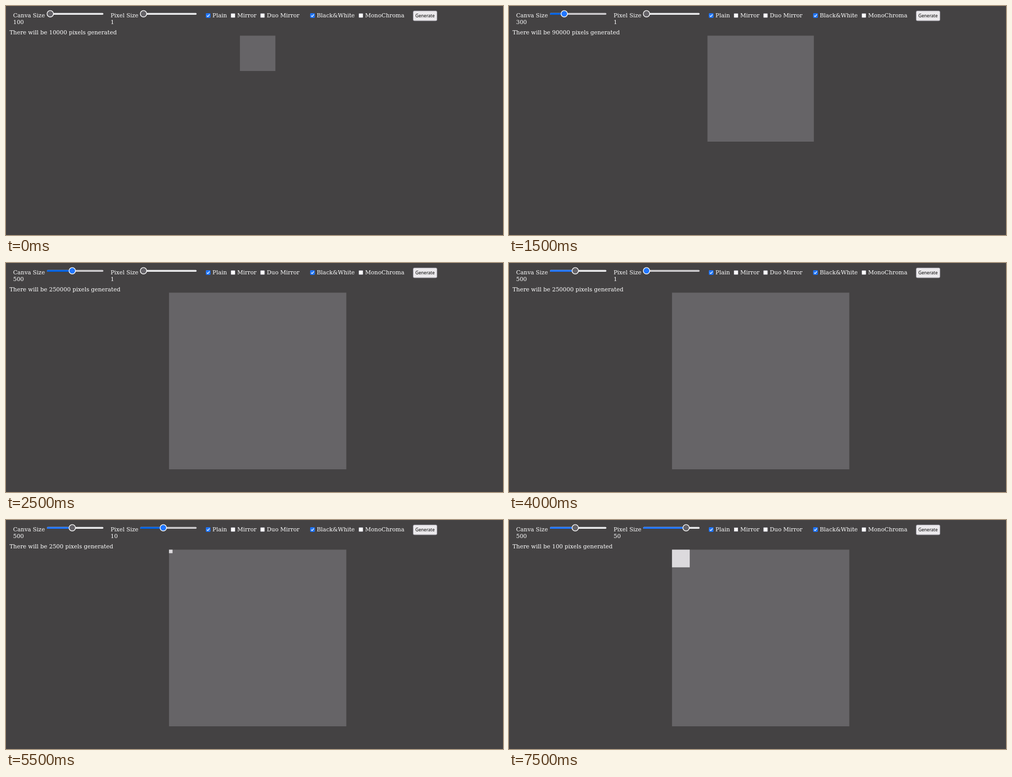
These frames come from a looping animation (960 px wide and 444 px high, 8000 ms). An HTML page:

```html
<!DOCTYPE html>
<html lang="en">
<head>
<meta charset="utf-8">
<title>Pixel generator</title>
<style>
html, body { margin: 0; width: 100%; height: 100%; overflow: hidden; background: #444243; }
svg { display: block; width: 960px; height: 444px; }
text { font: 10.96px "DejaVu Serif", "Noto Serif", serif; fill: #fff; white-space: pre; }
.button { font: 8.55px "Noto Sans", "Open Sans", sans-serif; fill: #000; }
</style>
</head>
<body>
<svg id="stage" viewBox="0 0 960 444"></svg>
<script>
const SCALE = 0.685;
const PIXELS = [1, 5, 10, 25, 50, 100];
const stage = document.getElementById("stage");

// Each step overrides the values of the one before it.
const steps = [
  { at: 0, canvas: 100, pixel: 0, track: 0, grab: 0, box: "" },
  { at: 1000, track: 1, grab: 1 },
  { at: 1500, canvas: 300 },
  { at: 2000, canvas: 400 },
  { at: 2500, canvas: 500 },
  { at: 3000, track: 0, grab: 0 },
  { at: 3500, track: 2 },
  { at: 4000, grab: 2 },
  { at: 4500, pixel: 1 },
  { at: 5000, pixel: 2 },
  { at: 6000, pixel: 4 },
  { at: 6500, grab: 0 },
  { at: 7000, track: 0, box: "Plain" },
  { at: 7500, box: "Mirror" }
];

const rect = (x, y, w, h, fill, extra = "") =>
  `<rect x="${x}" y="${y}" width="${w}" height="${h}" fill="${fill}" ${extra}/>`;
const text = (x, y, value, cls = "") =>
  `<text x="${x}" y="${y}" class="${cls}">${value.toString().replace("&", "&amp;")}</text>`;

function slider(x, part, hover, grabbed) {
  const thumb = x + 6.4 + part * 95.6;
  const fill = grabbed ? "#2176ff" : hover ? "#5a595f" : "#646267";
  return rect(x, 13.4, 109, 3.5, hover ? "#cfcdd0" : "#ececee", 'rx="1.7"') +
    rect(x, 13.4, thumb - x, 3.5, hover ? "#0062e6" : "#1f75fe", 'rx="1.7"') +
    `<circle cx="${thumb}" cy="15.1" r="6.2" fill="${fill}" stroke="#fff" stroke-width="1.4"/>`;
}

function checkbox(x, label, checked, hover) {
  const mark = `<path d="M${x + 2} 18.7l1.9 1.9 3.3-4.2" fill="none" stroke="#fff" stroke-width="1.3"/>`;
  const body = checked
    ? rect(x, 14, 9, 9, hover ? "#0062e6" : "#1f75fe", 'rx="1.4"') + mark
    : rect(x + .5, 14.5, 8, 8, "#fff", `rx="1.2" stroke="${hover ? "#5f5d66" : "#918f99"}"`);
  return body + text(x + 12.8, 22, label);
}

function draw(s) {
  const pixel = PIXELS[s.pixel];
  const side = s.canvas * SCALE;
  const left = 486.1 - side / 2;
  const check = (x, label, on) => checkbox(x, label, on, s.box === label);
  return rect(0, 0, 960, 444, "#444243") +
    text(13.7, 22, "Canva Size") + text(13.7, 35, s.canvas) +
    slider(79.1, (s.canvas - 100) / 900, s.track === 1, s.grab === 1) +
    text(202, 22, "Pixel Size") + text(202, 35, pixel) +
    slider(259.2, s.pixel / 5, s.track === 2, s.grab === 2) +
    check(386, "Plain", true) + check(434, "Mirror") + check(491, "Duo Mirror") +
    check(587.5, "Black&White", true) + check(681, "MonoChroma") +
    rect(786.4, 9.4, 46.2, 19.4, "#ebe9ec", 'rx="2.7" stroke="#918f99"') +
    text(790.8, 22.3, "Generate", "button") +
    text(6.8, 55, `There will be ${(s.canvas / pixel) ** 2} pixels generated`) +
    rect(left, 57.5, side, side, "#666467") +
    (pixel > 1 ? rect(left, 57.5, pixel * SCALE, pixel * SCALE, "#dcdadd") : "");
}

let shown;
function frame(now) {
  const past = steps.filter(step => step.at <= now % 8000);
  if (past.length !== shown) {
    shown = past.length;
    stage.innerHTML = draw(Object.assign({}, ...past));
  }
  requestAnimationFrame(frame);
}
frame(performance.now());
</script>
</body>
</html>
```
